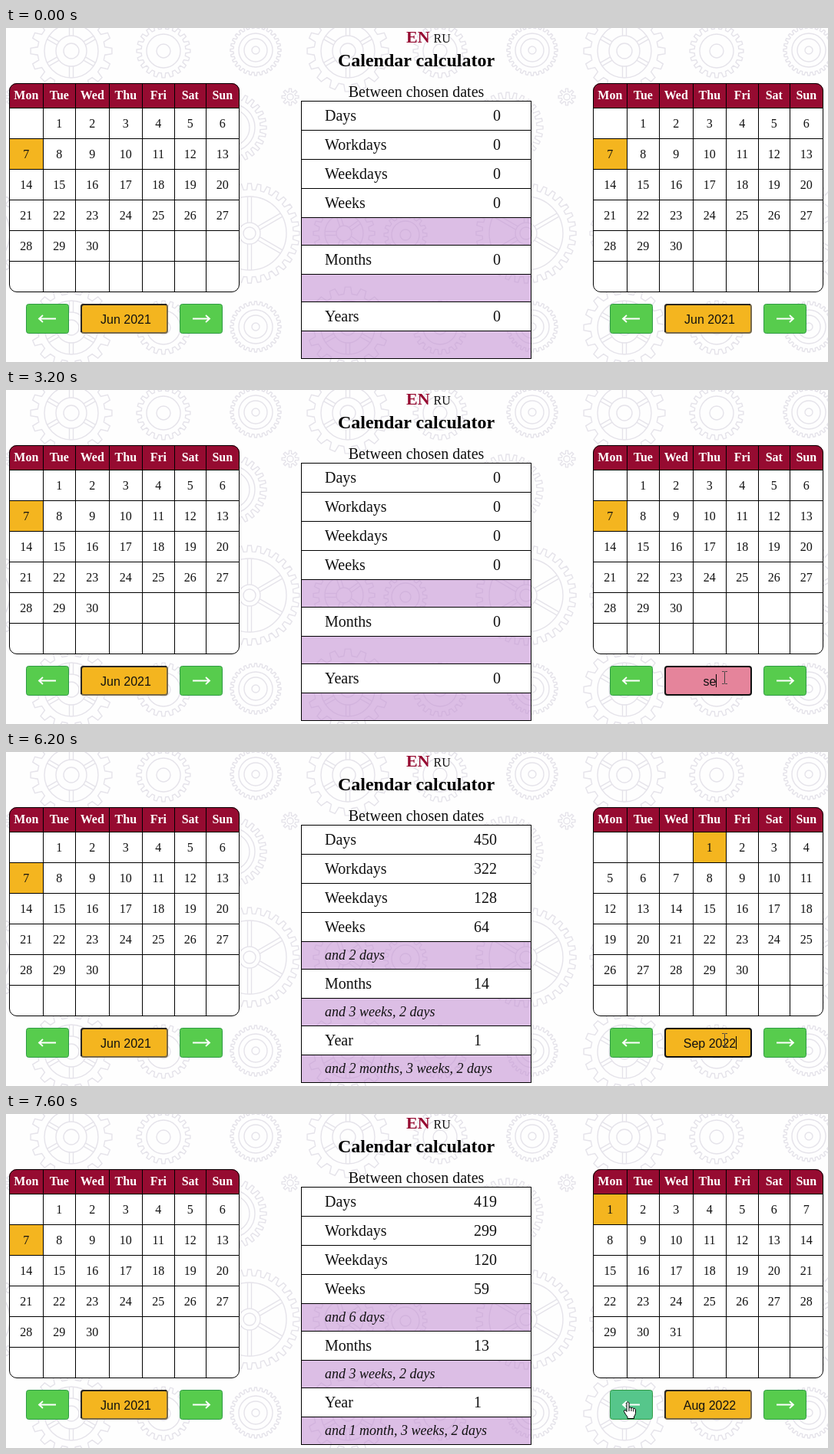
These frames come from a looping animation (1070 px wide and 436 px high, 8 s). An HTML page:

```html
<!DOCTYPE html>
<html lang="en">
<head>
<meta charset="utf-8">
<title>Calendar calculator</title>
<style>
  html, body { margin: 0; width: 100%; height: 100%; overflow: hidden; background: #fefefe; }
  svg { display: block; width: 1070px; height: 436px; }
  text { font-family: "Liberation Serif", "Times New Roman", serif; fill: #111; white-space: pre; }
  .mid { text-anchor: middle; }
  .day { font-size: 16px; }
  .head { font-size: 16px; font-weight: bold; fill: #fff; }
  .row { font-size: 20px; }
  .note { font-size: 18px; font-style: italic; }
  .field { font: 16px "Liberation Sans", Arial, sans-serif; }
  .gear { fill: none; stroke: #e5e3ea; stroke-width: 1.4; }
  .grid { fill: none; stroke: #000; stroke-width: 1; }
  .arrow { fill: none; stroke: #fff; stroke-width: 1.8; }
</style>
</head>
<body>
<svg viewBox="0 0 1070 436">
  <defs>
    <clipPath id="round"><rect x="4" y="72" width="300" height="273" rx="10"/></clipPath>
  </defs>
  <g id="back"></g>
  <g id="page"></g>
</svg>
<script>
const LOOP = 8000, STEP = 200, RIGHT = 760;
const RED = '#960b31', GOLD = '#f4b51f', PINK = '#e5849b', GREEN = '#57cc4d', TEAL = '#56c68b';
const DAYS = ['Mon', 'Tue', 'Wed', 'Thu', 'Fri', 'Sat', 'Sun'];
const MONTHS = ['Jan', 'Feb', 'Mar', 'Apr', 'May', 'Jun', 'Jul', 'Aug', 'Sep', 'Oct', 'Nov', 'Dec'];
const COLS = [4, 48, 90, 134, 177, 219, 260, 303];
const ROWS = [95, 133, 171, 209, 247, 283, 321, 357, 395, 431];

const text = (x, y, s, cls, extra = '') => `<text x="${x}" y="${y}" class="${cls}" ${extra}>${s}</text>`;
const box = (x, y, w, h, fill, extra = '') =>
  `<rect x="${x}" y="${y}" width="${w}" height="${h}" fill="${fill}" ${extra}/>`;
const path = (d, extra) => `<path d="${d}" ${extra}/>`;
const ring = (x, y, r) => `<circle cx="${x}" cy="${y}" r="${r}"/>`;
const move = (x, y, body) => `<g transform="translate(${x} ${y})">${body}</g>`;

// Toothed outline, inner rings and double-lined spokes
function gear(x, y, outer, depth, teeth, rings, spokes = 0) {
  const at = (r, a) => `${(r * Math.cos(a)).toFixed(1)} ${(r * Math.sin(a)).toFixed(1)}`;
  const inner = outer - depth, pitch = 2 * Math.PI / teeth;
  const points = [];
  for (let i = 0; i < teeth; i++) {
    const a = i * pitch;
    points.push(at(inner, a - pitch * .3), at(outer, a - pitch * .18),
                at(outer, a + pitch * .18), at(inner, a + pitch * .3));
  }
  let out = path('M' + points.join('L') + 'Z', '') + rings.map(r => ring(0, 0, r)).join('');
  for (let i = 0; i < spokes; i++) {
    const a = (i + .5) * 2 * Math.PI / spokes, far = rings[0], near = rings[1];
    for (const side of [-2.5, 2.5]) {
      out += path(`M${at(near, a + side / near)}L${at(far, a + side / far)}`, '');
    }
  }
  return move(x, y, out);
}

function background() {
  const tile =
    gear(85, 30, 53, 9, 16, [35, 20, 10], 6) +
    gear(205, 30, 35, 6, 20, [22, 9]) +
    gear(325, 29, 33, 4, 28, [22, 15, 5]) +
    gear(370, 90, 11, 4, 8, [4]) +
    gear(293, 130, 46, 8, 28, [31, 24]) +
    gear(317, 268, 65, 8, 32, [48, 14, 8], 6) +
    gear(80, 268, 40, 7, 18, [25, 10], 5) +
    gear(160, 270, 28, 5, 16, [18, 7]);
  let out = '';
  for (const y of [-360, 0, 361]) {
    for (const x of [-360, 0, 360, 720]) out += move(x, y, tile);
  }
  return `<g class="gear">${out}</g>`;
}

function calendar(x, year, month, picked) {
  const lead = (new Date(year, month, 1).getDay() + 6) % 7;
  const count = new Date(year, month + 1, 0).getDate();
  let cells = box(4, 72, 300, 273, '#fff') + box(4, 72, 300, 32, RED);
  let words = '';
  DAYS.forEach((name, i) => { words += text((COLS[i] + COLS[i + 1]) / 2 + .3, 93, name, 'head mid'); });
  for (let d = 1; d <= count; d++) {
    const i = d + lead - 1, c = i % 7, y = 104 + 40 * Math.floor(i / 7);
    if (d === picked) cells += box(COLS[c], y, COLS[c + 1] - COLS[c], 40, GOLD);
    words += text((COLS[c] + COLS[c + 1]) / 2 + .3, y + 26, d, 'day mid');
  }
  let lines = '';
  for (let i = 1; i < 7; i++) lines += `M${COLS[i] + .5} 72V345`;
  for (let y = 104; y < 340; y += 40) lines += `M4 ${y + .5}H304`;
  return move(x, 0, `<g clip-path="url(#round)">${cells}${path(lines, 'class="grid"')}</g>` +
    '<rect class="grid" x="4.5" y="72.5" width="299" height="272" rx="9.5"/>' + words);
}

function button(x, dir, fill) {
  const tip = x + 28 + dir * 11, back = tip - dir * 5;
  return box(x + .5, 360.5, 55, 38, fill, 'rx="3" stroke="#2f9a45"') +
    path(`M${tip - dir * 22} 379.5H${tip}M${back} 375L${tip} 379.5L${back} 384`, 'class="arrow"');
}

function controls(x, s) {
  const { value, focus, caret, fill = GOLD, hover } = s;
  let out = button(26, -1, hover ? TEAL : GREEN) + button(226, 1, GREEN);
  out += box(98, 361, 112, 37, fill, `rx="3" stroke="${focus ? '#101010' : '#76684a'}" stroke-width="2"`);
  if (!focus) out += path('M98 397V364Q98 361 101 361H209', 'fill="none" stroke="#2a2722" stroke-width="2"');
  out += text(156, 386, value, 'field mid', s.id ? `id="${s.id}"` : '');
  if (caret) out += box(0, 371, 1, 17, '#000', 'id="caret"');
  return move(x, 0, out);
}

function results(r) {
  const labels = ['Days', 'Workdays', 'Weekdays', 'Weeks', 0, 'Months', 0, r.years === 1 ? 'Year' : 'Years', 0];
  let out = '', lines = 'M384.5 95V432M683.5 95V432';
  let v = 0, n = 0;
  labels.forEach((label, i) => {
    const y = ROWS[i], h = ROWS[i + 1] - y;
    if (label) {
      const x = r.notes ? 609 : 634;
      out += box(384, y, 300, h, '#fff') + text(415, y + 26, label, 'row') + text(x, y + 26, r.values[v++], 'row');
    } else {
      out += box(384, y, 300, h, 'rgb(199,149,214)', 'fill-opacity=".6"');
      if (r.notes) out += text(415, y + 24, 'and ' + r.notes[n], 'note');
      n++;
    }
  });
  ROWS.forEach(y => { lines += `M384 ${y + .5}H684`; });
  return out + path(lines, 'class="grid"');
}

const RESULTS = [
  { years: 0, values: [0, 0, 0, 0, 0, 0] },
  { years: 1, values: [450, 322, 128, 64, 14, 1], notes: ['2 days', '3 weeks, 2 days', '2 months, 3 weeks, 2 days'] },
  { years: 1, values: [419, 299, 120, 59, 13, 1], notes: ['6 days', '3 weeks, 2 days', '1 month, 3 weeks, 2 days'] },
];
const PICKS = [[2021, 5, 7], [2022, 8, 1], [2022, 7, 1]];

const TYPED = [[2800, ''], [3000, 's'], [3200, 'se'], [3400, 'sep'], [4200, 'sep2'], [4400, 'sep20'], [4800, 'sep202']];
// time, x, y
const TRACK = [[1400, 714, 429], [2400, 935, 375], [6200, 935, 375], [7200, 809, 375], [8000, 809, 375]];

const POINTERS = {
  arrow: path('M0 0V16L3.8 12.5L6.4 18.3L9 17.2L6.5 11.6H11.5Z', 'fill="#fff" stroke="#000"'),
  beam: path('M-3.5 -8H-1Q0 -8 0 -7Q0 -8 1 -8H3.5M0 -7V7M-3.5 8H-1Q0 8 0 7Q0 8 1 8H3.5',
    'fill="none" stroke="#4a4545"'),
  hand: path('M-1.5 1.5Q0 -1 1.5 1.5V8Q3 6.5 4.5 8.3Q6 7 7.3 9Q9 8 10 10.3V15Q9.5 18 8 19.5V22H-.5V20' +
    'Q-3 17 -5 13Q-5.5 11 -3.5 11Q-2.5 11.5 -1.5 13ZM1.5 8V12.5M4.5 8.5V12.5M7.3 9.5V13',
    'fill="#fff" stroke="#000" stroke-linejoin="round"'),
};

function pointer(t) {
  if (t < TRACK[0][0]) return '';
  const i = TRACK.findIndex(p => p[0] > t);
  const [t0, x0, y0] = TRACK[i - 1], [t1, x1, y1] = TRACK[i];
  const k = (t - t0) / (t1 - t0), e = k * k * (3 - 2 * k);
  const x = x0 + (x1 - x0) * e, y = y0 + (y1 - y0) * e;
  const overField = x > 857 && x < 971 && y > 360 && y < 399;
  const kind = t >= 7400 ? 'hand' : overField ? 'beam' : 'arrow';
  return move(Math.round(x) + .5, Math.round(y) + .5, POINTERS[kind]);
}

function draw(t) {
  const phase = t < 5000 ? 0 : t < 7400 ? 1 : 2;
  const pick = PICKS[phase];
  const typing = t >= 2800 && t < 5000;
  const focus = t >= 2600 && t < 7200;
  const blink = (t >= 3800 && t < 4200) || (t >= 5600 && t < 6200) || (t >= 6800 && t < 7200);
  const value = typing ? TYPED.filter(k => k[0] <= t).pop()[1] : `${MONTHS[pick[1]]} ${pick[0]}`;

  const page = document.getElementById('page');
  page.innerHTML =
    text(521, 19, 'EN', 'title', `font-size="22" font-weight="bold" style="fill:${RED}"`) +
    text(556.5, 19, 'RU', 'day') +
    text(534, 50, 'Calendar calculator', 'mid', 'font-size="24" font-weight="bold" style="fill:#000"') +
    text(534, 90, 'Between chosen dates', 'row mid') +
    results(RESULTS[phase]) +
    calendar(0, ...PICKS[0]) + controls(0, { value: 'Jun 2021' }) +
    calendar(RIGHT, ...pick) +
    controls(RIGHT, { value, focus, caret: focus && !blink, fill: typing ? PINK : GOLD, hover: t >= 7200, id: 'entry' }) +
    pointer(t);

  const caret = document.getElementById('caret');
  if (caret) {
    const width = document.getElementById('entry').getComputedTextLength();
    caret.setAttribute('x', Math.round(156 + width / 2));
  }
}

document.getElementById('back').innerHTML = background();
let last = -1;
function tick() {
  const t = Math.floor(performance.now() % LOOP / STEP) * STEP;
  if (t !== last) draw(last = t);
  requestAnimationFrame(tick);
}
tick();
</script>
</body>
</html>
```
